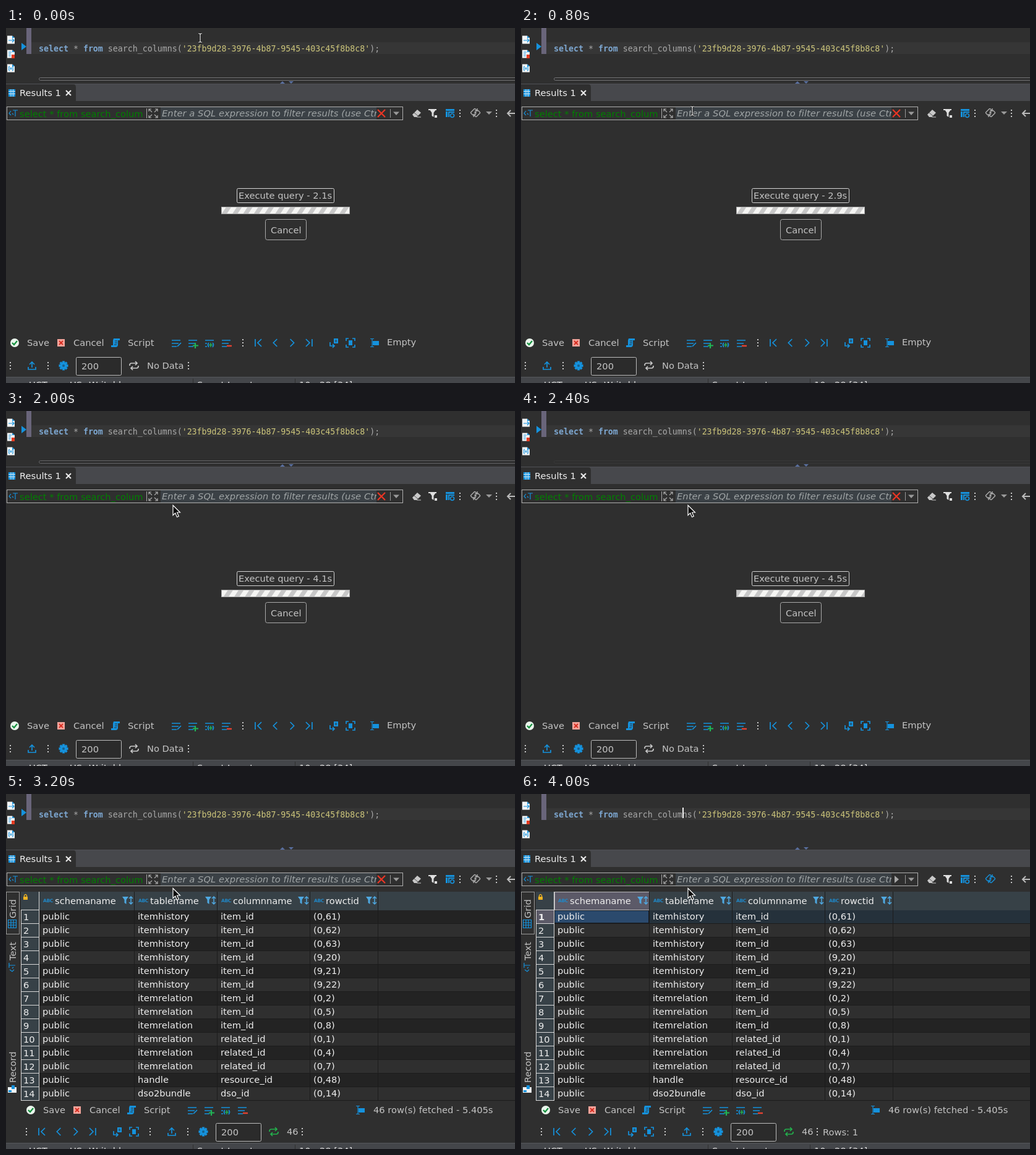
An HTML page that plays this animation: 823x574 px, repeating every 4.1 s.

```html
<!DOCTYPE html>
<html lang="en">
<head>
<meta charset="utf-8">
<title>Query results</title>
<style>
  html, body { margin: 0; width: 100%; height: 100%; overflow: hidden; background: #2f2f2f; }
  svg { display: block; width: 823px; height: 574px; }
  text { font: 14.667px "DejaVu Sans", sans-serif; fill: #c3c3c3; white-space: pre; }
  .code { font: 13.289px "DejaVu Sans Mono", monospace; fill: #aaa; }
  .code .key { font-weight: bold; fill: #7da7d1; }
  .code .str { fill: #cdc67b; }
  .hint { font-style: italic; fill: #a0a5a6; letter-spacing: .06px; }
  .blue { fill: none; stroke: #1592dd; stroke-width: 1.7; }
  .fine .blue { stroke-width: 1.2; }
  .solid { fill: #1592dd; }
  .cell { fill: #eee; }
  .abc { font-size: 7.5px; font-weight: bold; fill: #2088c8; letter-spacing: -.4px; }
</style>
</head>
<body>
<svg id="stage" viewBox="0 0 823 574"></svg>
<script>
const LOOP = 4100;
const TICKS = [0, 100, 200, 300, 400, 600, 700, 800, 1000, 1100, 1200, 1300, 1500, 1600, 1800,
  2000, 2100, 2200, 2400, 2500, 2600, 2800, 2900, 3100, 3200, 3300, 3400, 4000];
const CARET = [[100, 800], [1200, 2000], [2500, 3200], [4000, LOOP]];
const POINTER = [[0, 314, 16], [100, 312, 20], [200, 300, 46], [300, 274, 82], [400, 251, 114],
  [600, 255, 122], [700, 268, 130], [800, 277, 134], [1000, 275, 141], [1100, 272, 148], [1200, 270, 152.5]];
const FADE = [[0, 1], [2000, .8], [2100, .55], [2200, .25], [2400, .12], [2500, 0]];
const RESULT = 3200, SELECTED = 3300, COUNTED = 3400;

const rect = (x, y, w, h, fill, extra = '') =>
  `<rect x="${x}" y="${y}" width="${w}" height="${h}" fill="${fill}" ${extra}/>`;
const box = (x, y, w, h, stroke, r = 0, fill = 'none') =>
  rect(x + .5, y + .5, w - 1, h - 1, fill, `stroke="${stroke}" rx="${r}"`);
const text = (x, y, s, attrs = '') => `<text x="${x}" y="${y}" ${attrs}>${s}</text>`;
const path = (d, attrs) => `<path d="${d}" ${attrs}/>`;
const line = (d, color, w = 1) => path(d, `fill="none" stroke="${color}" stroke-width="${w}"`);
const at = (x, y, body, extra = '') => `<g transform="translate(${x} ${y}) ${extra}">${body}</g>`;
const group = (id, body) => `<g id="${id}">${body}</g>`;
const fine = body => `<g class="fine">${body}</g>`;
const blue = d => path(d, 'class="blue"');
const solid = d => path(d, 'class="solid"');

// Icons are drawn around their own centre.
const dots = [-5, 0, 5].map(y => rect(-1, y - 1, 2, 2, '#c8c8c8')).join('');
const page = path('M-6-6.5H2L6-3V6.5H-6Z', 'fill="#f2f5f7"') + solid('M2-6.5V-3H6Z');
const docs = [
  blue('M-4 1H5M2-2L5 1L2 4'),
  blue('M-4-3H1M-4 0H0M-4 3H0') + rect(1, 1, 5, 6, '#e33b22'),
  blue('M-2-3Q-4-3-3 0Q-4 4-2 4M2-3Q4-3 3 0Q4 4 2 4M-1-1L1 2M1-1L-1 2')
].map(mark => fine(page + mark));
const saveIcon = '<circle r="7" fill="#eaf5ec"/>' + line('M-4 0L-1 3L4-3', '#16913f', 2.3);
const rejectIcon = rect(-6, -6, 12, 12, '#f2a39a') + line('M-3-3L3 3M3-3L-3 3', '#d8281c', 1.8);
const scriptIcon = solid('M-3-7H7V-4H4V3Q4 7 0 7H-7V4H-4V-4Z') + line('M-1-3H3M-1 0H3M-2 3H2', '#2f2f2f');
const lines = blue('M-8-5H6M-8 0H3M-8 5H0');
const editIcons = [
  lines + blue('M1 5L7-1'),
  lines + line('M3-1V8M-1 3.500H8', '#20b455', 2.2),
  blue('M-8-5H6M-8 0H-5M-8 5H-5M-2-1Q-5 2-2 6M4-1Q7 2 4 6') + line('M1-1V6M-2 2.500H4', '#20b455', 1.5),
  lines + line('M0 4H8', '#e64232', 2.4)
];
const navIcons = [blue('M-5-6V6M5-6L-1 0L5 6'), blue('M3-6L-3 0L3 6'), blue('M-3-6L3 0L-3 6'), blue('M5-6V6M-5-6L1 0L-5 6')];
const jumpIcon = solid('M0-7H7V1H0Z') + blue('M-6-1V5H1M-2 2L1 5L-2 8') + line('M2-4H5M2-2H5', '#2f2f2f');
const fitIcon = blue('M-7-3V-7H-3M3-7H7V-3M7 3V7H3M-3 7H-7V3') + solid('M-3-4H3V4H-3Z');
const cellIcon = fine(blue('M-4-6V6M-7-6.500H-1M-7 6.500H-1')) + solid('M-3-3H7V4H-3Z');
const exportIcon = blue('M-6 2V6H6V2M0 3V-6M-4-2L0-6L4-2');
const gearIcon = [0, 45, 90, 135].map(a => rect(-2, -7.5, 4, 15, '#1592dd', `transform="rotate(${a})"`)).join('') +
  '<circle r="5" fill="#1592dd"/><circle r="2" fill="#17608d"/>';
const refresh = c => line('M-7 0V-1Q-7-4-4-4H5M2-7L5-4L2-1M7 0V1Q7 4 4 4H-5M-2 1L-5 4L-2 7', c, 1.7);
const cycle = c => line('M-4 4L-7 1Q-8 0-7-1L-2-6Q-1-7 0-6L3-3M3-7V-3H-1M4-4L7-1Q8 0 7 1L2 6Q1 7 0 6L-3 3M-3 7V3H1', c, 1.4) +
  rect(-1.5, -1.5, 3, 3, c);
const expandIcon = line('M-2-2L-7-7M-7-3V-7H-3M2-2L7-7M3-7H7V-3M-2 2L-7 7M-7 3V7H-3M2 2L7 7M7 3V7H3', '#aaa', 1.2);
const gridIcon = fine(blue('M-6.500-6.500H6.500V6.500H-6.500ZM-6.500-2H6.500M-6.500 2H6.500M-2-6V6M2-6V6'));
const sqlIcon = fine(blue('M-4-4L-7 0L-4 3M-1-5H7M3-5V5M-2 0L0 2'));
const funnel = 'M-5-6H5L1.500-1V6L-1.500 4V-1Z';

const row = (y, items) => items.map(([x, icon]) => at(x, y, icon)).join('');

function editActions(dx, y) {
  return row(y, [[14 + dx, saveIcon], [89 + dx, rejectIcon], [177 + dx, scriptIcon]]) +
    row(y + 1, editIcons.map((icon, i) => [276 + dx + 27 * i, icon])) +
    text(34 + dx, y + 5, 'Save') + text(109 + dx, y + 5, 'Cancel') + text(197 + dx, y + 5, 'Script');
}
const navigation = (x, y) => row(y, navIcons.map((icon, i) => [x + 27.3 * i, icon])) +
  row(y, [[x + 122, jumpIcon], [x + 149, fitIcon]]);
const fetchActions = (dx, color) =>
  row(546, [[42 + dx, exportIcon], [68 + dx, dots], [93 + dx, gearIcon], [207 + dx, refresh(color)]]) +
  box(113 + dx, 532, 74, 30, '#bcbcbc', 2, '#2b2b2b') + text(122 + dx, 552, '200');

function editor() {
  return rect(0, 0, 823, 90, '#2f2f2f') + rect(41, 23, 782, 19, '#363636') + rect(33, 0, 8, 42, '#69657a') +
    docs.map((d, i) => at(8, 19 + 23 * i, d)).join('') + group('marker', solid('M25 24L33 30L25 36Z')) +
    `<text class="code" x="53" y="38"><tspan class="key">select</tspan> * <tspan class="key">from</tspan> search_columns(` +
    `<tspan class="str">'23fb9d28-3976-4b87-9545-403c45f8b8c8'</tspan>);</text>` +
    group('scroll', box(53, 80, 790, 5, '#77777a', 2, '#292929'));
}

function filterBar() {
  return rect(0, 90, 823, 28, '#47484c') + rect(0, 90, 823, 1, '#505156') +
    path('M0 118V91H109Q113 91 113 96V118Z', 'fill="#2f2f2f"') +
    path('M443 90L447 86L451 90ZM457 86H465L461 90Z', 'fill="#596f9f"') +
    solid('M4 99H15V111H4Z') + line('M4 102.500H15M4 106.500H15M8 99V111M11.500 99V111', '#cfe8f7') +
    text(22, 110, 'Results 1', 'style="fill:#eee"') + line('M97 101L105 109M105 101L97 109', '#eee', 2) +
    box(1, 127, 641, 22, '#b0b0b0') + rect(250, 128, 349, 20, '#3b4146') +
    at(12, 138, sqlIcon) + text(22, 144, 'select * from search_colum', 'style="fill:#008000"') +
    line('M227.500 130V146', '#aaa') + at(238, 138, expandIcon) +
    `<svg x="250" y="128" width="349" height="20">${text(2, 15, 'Enter a SQL expression to filter results (use Ctrl+Space)', 'class="hint"')}</svg>` +
    line('M621.500 131V145', '#999') + path('M626 135.500H636L631 141Z', 'fill="#999"') +
    at(664, 138, path('M-7 2L1-6L7-1L0 6H-4Z', 'fill="#c9c9c9"') + line('M-4-1L2 4', '#555') + line('M0 6H7', '#c9c9c9')) +
    at(690, 138, path(funnel, 'fill="#e0e0e0"') + rect(3, 3, 4, 4, '#e0e0e0')) + line('M683 132H696', '#e0e0e0', 2) +
    at(718, 138, solid('M-7-7H7V-1H-1V6H-7Z') + line('M-7-3.500H7M-3.500-3V6', '#2f2f2f') +
      '<circle cx="3.500" cy="3.500" r="3" class="blue"/>') +
    row(138, [[734, dots], [793, dots]]) + line('M823 138H812M816 133L811 138L816 143', '#bbb', 2) +
    group('running', line('M601 132L613 144M613 132L601 144', '#ee3524', 2.2) + at(759, 137, cycle('#b0b0b0')) +
      path('M776 135H786L781 140Z', 'fill="#999"')) +
    group('ready', path('M604 132L611 138L604 144Z', 'fill="#a6a6a6"') + at(759, 137, cycle('#1592dd')));
}

function waiting() {
  return box(373, 259, 158, 24, '#d5d5d5', 2) + text(376, 276, '', 'id="elapsed"') +
    `<svg x="348" y="289" width="208" height="12">${rect(0, 0, 208, 12, '#c8c8c8')}<g id="stripes">` +
    Array.from({ length: 15 }, (_, i) => path(`M${i * 17.3 - 26} 12L${i * 17.3 - 18} 0h9l-8 12Z`, 'fill="#f5f5f3"')).join('') +
    `</g>${box(0, 0, 208, 12, '#a9a9a9')}</svg>` +
    box(419, 309, 67, 34, '#aaa', 3) + text(428, 332, 'Cancel') +
    editActions(0, 509) + navigation(408, 509) + row(509, [[383, dots], [596, cellIcon]]) + text(616, 513, 'Empty') +
    row(546, [[7, dots], [295, dots]]) + fetchActions(0, '#c8c8c8') + text(228, 551, 'No Data');
}

const TOP = 188, ROW = 22, WHITE = '#d8d8d8', RULE = '#1c1c1c';
const edges = [54, 208, 342, 492, 602];
const titles = ['schemaname', 'tablename', 'columnname', 'rowctid'];
const records = [
  ['itemhistory', 'item_id', '0,61 0,62 0,63 9,20 9,21 9,22'],
  ['itemrelation', 'item_id', '0,2 0,5 0,8'],
  ['itemrelation', 'related_id', '0,1 0,4 0,7'],
  ['handle', 'resource_id', '0,48'],
  ['dso2bundle', 'dso_id', '0,14']
].flatMap(([table, column, ids]) => ids.split(' ').map(id => ['public', table, column, `(${id})`]));
const HEIGHT = ROW * records.length;

const sideLabel = (y, s) => at(16, y, text(0, 0, s), 'rotate(-90)');

function grid() {
  let out = rect(0, 158, 24, 338, '#2f2f2f') + box(0, 158, 22, 69, '#999') +
    sideLabel(201, 'Grid') + at(10, 210, gridIcon) + sideLabel(269, 'Text') + at(10, 280, sqlIcon, 'rotate(-90)') +
    sideLabel(467, 'Record') + at(10, 477, path('M-7-3H7V6H-7Z', 'fill="#eef3f5"') + solid('M-1-6H4V0H-1ZM-6 2H-1V5H-6Z'));
  out += rect(24, 158, 799, TOP - 158, '#374147') + rect(24, TOP, 30, HEIGHT, '#374147');
  records.forEach((_, i) => {
    const y = TOP + ROW * i;
    out += rect(54, y, 769, ROW, i % 2 ? '#2f2f2f' : '#232323') + rect(54, y + ROW - 1, 769, 1, RULE);
  });
  out += group('selection', rect(24, TOP, 30, ROW, '#5c5a68') + rect(54, TOP, 769, ROW - 1, '#25313b') +
    box(54, TOP, 153, ROW - 1, '#171d24', 0, '#2b4a6d') + box(54, 158, 154, TOP - 158, '#b5b5b8', 0, '#5c5a68'));
  edges.slice(1).forEach(x => out += rect(x - 1, 158, 1, TOP - 158 + HEIGHT, RULE));
  for (let i = 0; i <= records.length; i++) out += rect(24, TOP + ROW * i - 1, 30, 1, WHITE);
  out += rect(53, 158, 1, TOP - 158 + HEIGHT, WHITE) + rect(24, TOP, 1, HEIGHT, WHITE);
  out += rect(28, 166, 7, 5, '#f0b422') + line('M29.500 166V164Q31.500 161 33.500 164V166', '#f0b422', 1.3);
  titles.forEach((title, c) => {
    const left = edges[c], right = edges[c + 1];
    out += text(left + 6, 175, 'ABC', 'class="abc"') + text(left + 25, 178, title, 'class="cell"') +
      at(right - 15, 172, path(funnel, 'fill="#4fa9e2"')) +
      at(right - 6, 172, line('M0-6V6M-3-3L0-6L3-3M-3 3L0 6L3 3', '#4fa9e2', 1.5));
  });
  records.forEach((record, i) => {
    const y = 203 + ROW * i;
    out += text(28, y + 1, i + 1, `class="cell" ${i ? '' : 'id="first"'}`);
    record.forEach((value, c) => out += text(edges[c] + 5, y, value, 'class="cell"'));
  });
  return out + editActions(26, 511) + at(573, 511, cellIcon) + text(594, 516, '46 row(s) fetched - 5.405s') +
    row(546, [[33, dots], [233, dots], [294, dots], [479, dots]]) + navigation(58, 546) +
    fetchActions(226, '#23b14d') + text(454, 551, '46') + text(488, 552, 'Rows: 1', 'id="count"');
}

function statusBar() {
  return rect(0, 564, 823, 10, '#44464a') + rect(0, 564, 823, 1, '#55575b') +
    line('M302.500 567V574M467.500 567V574', '#2f2f2f') +
    [[37, 'UCT'], [103, 'US'], [134, 'Writable'], [309, 'Smart Insert'], [474, '10 : 28 [34]']]
      .map(([x, s]) => text(x, 582, s, 'style="fill:#ddd"')).join('');
}

const beam = 'M-3-7H-1L0-6L1-7H3M0-6V6M-3 7H-1L0 6L1 7H3';
const stage = document.getElementById('stage');
stage.innerHTML = editor() + filterBar() + group('waiting', waiting()) + group('grid', grid()) + statusBar() +
  rect(261, 22, 2, 17, '#f0f0f0', 'id="caret"') +
  group('beam', line(beam, '#111', 3) + line(beam, '#f4f4f4', 1.2)) +
  group('arrow', path('M0 0V16L3.700 12.500L6.500 19L9.300 17.700L6.500 11.500H11.500Z', 'fill="#080808" stroke="#fff" stroke-width="1.2"'));

const el = Object.fromEntries([...stage.querySelectorAll('[id]')].map(node => [node.id, node]));
const show = (id, on) => el[id].style.display = on ? '' : 'none';
const latest = (keys, t) => keys.filter(key => key[0] <= t).pop();

function render(t) {
  const step = TICKS.filter(tick => tick <= t).length - 1;
  const done = t >= RESULT;
  el.elapsed.textContent = `Execute query - ${(2.1 + TICKS[step] / 1000).toFixed(1)}s`;
  el.stripes.setAttribute('transform', `translate(${(step * 2.5) % 17.3} 0)`);
  el.scroll.style.opacity = latest(FADE, t)[1];
  show('caret', CARET.some(([on, off]) => t >= on && t < off));
  show('waiting', !done);
  show('grid', done);
  show('selection', t >= SELECTED);
  el.first.style.fontWeight = t >= SELECTED ? 'bold' : '';
  show('marker', t < COUNTED);
  show('running', t < COUNTED);
  show('ready', t >= COUNTED);
  show('count', t >= COUNTED);
  const [, x, y] = latest(POINTER, t);
  const pointer = t >= 1100 ? 'arrow' : 'beam';
  show('beam', pointer === 'beam');
  show('arrow', pointer === 'arrow');
  el[pointer].setAttribute('transform', `translate(${x} ${y})`);
}

const start = performance.now();
function frame() {
  render((performance.now() - start) % LOOP);
  requestAnimationFrame(frame);
}
frame();
</script>
</body>
</html>
```
